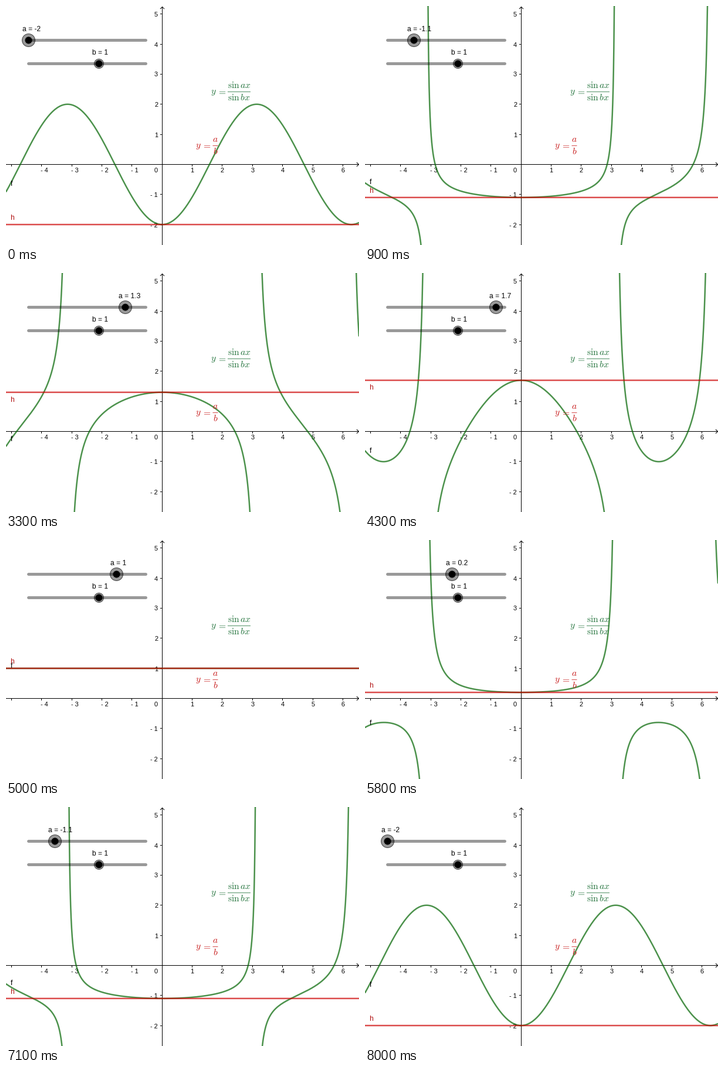
These frames come from a looping animation (602x408 px, 8100 ms). A matplotlib script:

```python
import numpy as np
import matplotlib.pyplot as plt
from matplotlib.animation import FuncAnimation
from matplotlib.patches import Circle

W, H, DPI = 602, 408, 100
PT = 72 / DPI                        # points per pixel
OX, OY, UNIT = 266.3, 270.4, 51.34   # origin and scale of the graph
AXIS_X, AXIS_Y = 266.5, 270.5        # pixel centres of the axis lines
FRAMES, INTERVAL = 81, 100
GREEN, RED = "#006400", "#cc0000"
B = 1

plt.rcParams["font.family"] = "Liberation Sans"
plt.rcParams["mathtext.fontset"] = "cm"

fig = plt.figure(figsize=(W / DPI, H / DPI), dpi=DPI, facecolor="white")
ax = fig.add_axes([0, 0, 1, 1])
ax.set_xlim(0, W)
ax.set_ylim(H, 0)
ax.axis("off")


def px(x):
    return OX + UNIT * x


def py(y):
    return OY - UNIT * y


def label(x, y, text, size=12, color="black", ha="left", z=6):
    return ax.text(x, y, text, fontsize=size * PT, color=color, ha=ha,
                   va="baseline", zorder=z)


def line(xs, ys, color="black", width=1.0, z=1, cap="butt", **kw):
    return ax.plot(xs, ys, color=color, lw=width * PT, zorder=z, snap=False,
                   solid_capstyle=cap, **kw)[0]


def draw_axes():
    line([0, W], [AXIS_Y, AXIS_Y])
    line([AXIS_X, AXIS_X], [1, H])
    line([W - 4, W - 0.5, W - 4], [AXIS_Y - 3.5, AXIS_Y, AXIS_Y + 3.5])
    line([AXIS_X - 3.5, AXIS_X, AXIS_X + 3.5], [5, 1.5, 5])
    for n in range(-5, 7):
        if n == 0:
            continue
        x = np.floor(px(n)) + 0.5
        line([x, x], [AXIS_Y, AXIS_Y + 3.5])
        if n > -5:
            text, shift = (f"- {-n}", 5) if n < 0 else (str(n), 0)
            label(x + shift, 284.5, text, 11, ha="center", z=1)
    for n in range(-2, 6):
        if n == 0:
            continue
        y = np.floor(py(n)) + 0.5
        line([AXIS_X - 3.5, AXIS_X], [y, y])
        label(259, y + 4, f"- {-n}" if n < 0 else str(n), 11, ha="right", z=1)
    label(259, 284.5, "0", 11, ha="right", z=1)


def draw_formula(x, bar_x, bar_y, bar_width, top, bottom, color, em=15.6):
    base = bar_y + 0.25 * em
    mid = bar_x + bar_width / 2
    label(x, base, "$y$", em, color)
    label(x + 1.18 * em, base, "$=$", em, color, "center")
    label(mid, base - 0.677 * em, f"${top}$", em, color, "center")
    label(mid, base + 0.686 * em, f"${bottom}$", em, color, "center")
    line([bar_x, bar_x + bar_width], [bar_y, bar_y], color, 0.8, z=6)


def draw_slider(y, radius, x):
    """Draw track, handle and caption; return the parts that move."""
    line([38.5, 238.5], [y, y], "black", 5, z=4, alpha=0.4, cap="round")
    halo = Circle((x, y), radius - 0.5, facecolor=(0, 0, 0, 0.4),
                  edgecolor=(0, 0, 0, 0.65), lw=PT, zorder=5)
    knob = Circle((x, y), 6, facecolor="black", edgecolor="none", zorder=6)
    ax.add_patch(halo)
    ax.add_patch(knob)
    caption = label(x - 11.5, y - 15.5, "")
    return halo, knob, caption


draw_axes()
draw_formula(349.3, 378, 146.5, 39, r"\sin ax", r"\sin bx", "#26753f")
draw_formula(323.3, 352.5, 238.5, 9, "a", "b", "#c81e1e")
halo, knob, a_caption = draw_slider(58.5, 11.5, 38.5)
draw_slider(98.5, 8.5, 158.5)[2].set_text(f"b = {B}")

xs = np.linspace(-5.25, 6.6, 6002)
curve = line([], [], GREEN, 2.5, z=2, alpha=0.7)
ratio_line = line([], [], RED, 2.5, z=3, alpha=0.7)
f_label = label(8, 0, "f")
h_label = label(7, 0, "h", color="#b01010")


def ratio(x, a):
    return np.sin(a * x) / np.sin(B * x)


def update(i):
    a = round(-2 + 0.1 * min(i, FRAMES - 1 - i), 1) + 0.0

    ys = ratio(xs, a)
    ys[np.abs(ys) > 12] = np.nan    # break the curve at its poles
    curve.set_data(px(xs), py(ys))
    f_label.set_y(np.floor(py(ratio(-5.094, a)) - 0.8))

    level = py(a / B)
    ratio_line.set_data([-5, W + 5], [level, level])
    h_label.set_y(np.round(level + (16 if 2 * level < H else -8)))

    x = 138.5 + 50 * a
    halo.center = knob.center = (x, 58.5)
    a_caption.set_x(x - 11)
    a_caption.set_text(f"a = {a:g}")
    return curve, ratio_line, f_label, h_label, halo, knob, a_caption


anim = FuncAnimation(fig, update, frames=FRAMES, interval=INTERVAL,
                     repeat=True, repeat_delay=0, blit=False)
plt.show()
```
